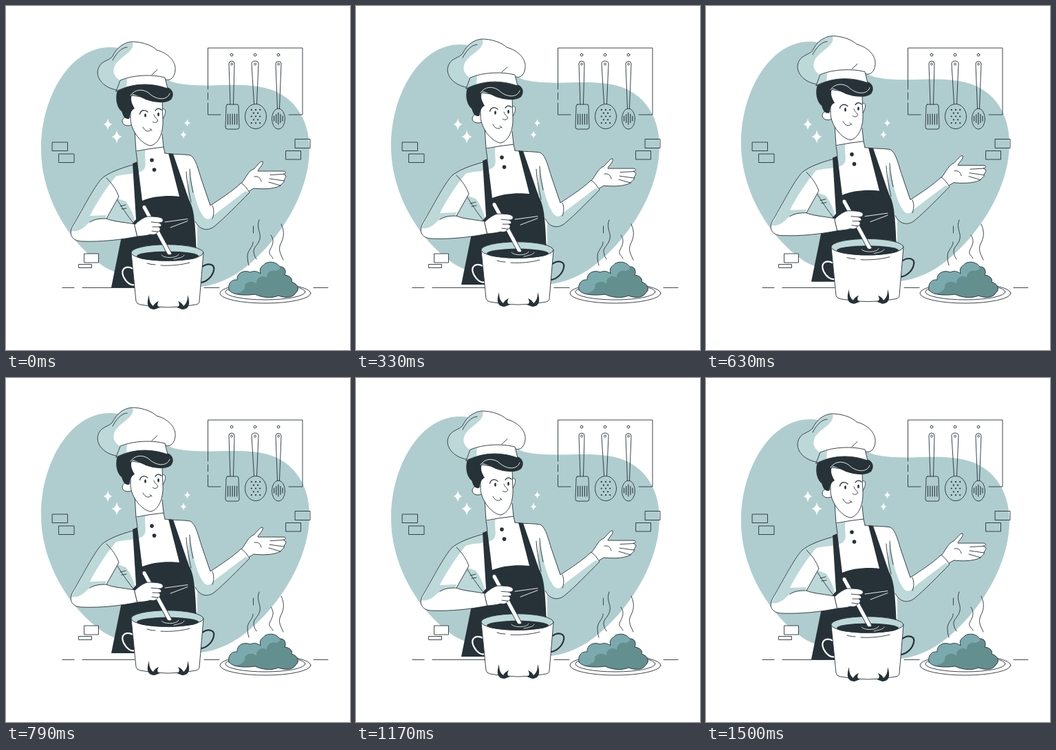
An HTML page with a canvas for the animation above (1.54 s loop, 500 by 500 pixels).

```html
<!DOCTYPE html>
<html lang="en">
<head>
<meta charset="utf-8">
<title>Chef stirring a pot</title>
<style>
  html, body { margin: 0; width: 100%; height: 100%; overflow: hidden; background: #fff; }
  canvas { display: block; width: 100vw; height: 100vh; }
</style>
</head>
<body>
<canvas id="stage" width="500" height="500"></canvas>
<script>
const ctx = document.getElementById('stage').getContext('2d');
const INK = '#263238', TEAL = '#afcdcf', SHADE = '#bdd8d9', WHITE = '#fff';
const FOOD = '#7aaaad', FOOD_SHADE = '#648f8f';
const LOOP = 1540, PERIOD = 1500, LEAD = 20, FRAME = 1000 / 24, RISE = 10;

ctx.lineCap = ctx.lineJoin = 'round';

function paint(path, fill, stroke, width = 1) {
  const p = typeof path === 'string' ? new Path2D(path) : path;
  if (fill) { ctx.fillStyle = fill; ctx.fill(p); }
  if (stroke) { ctx.strokeStyle = stroke; ctx.lineWidth = width; ctx.stroke(p); }
}
const fill = (d, color) => paint(d, color);
const line = (d, width = 0.9, color = INK) => paint(d, null, color, width);
const solid = (d, color = WHITE) => paint(d, color, INK, 0.9);

function oval(x, y, rx, ry, color, stroke, width = 0.9) {
  const p = new Path2D();
  p.ellipse(x, y, rx, ry, 0, 0, Math.PI * 2);
  paint(p, color, stroke, width);
}

function sparkle(x, y, w, h) {
  fill(`M${x} ${y - h}Q${x + w * .16} ${y - h * .16} ${x + w} ${y}Q${x + w * .16} ${y + h * .16} ${x} ${y + h}` +
       `Q${x - w * .16} ${y + h * .16} ${x - w} ${y}Q${x - w * .16} ${y - h * .16} ${x} ${y - h}Z`, WHITE);
}

function blob() {
  fill('M51 208C51 130 95 58 153 60C205 62 212 104 248 112C285 120 330 111 366 117C416 124 441 162 441 208' +
       'C441 262 411 314 382 347C354 379 323 403 284 408C240 412 188 402 146 381C95 349 51 280 51 208Z', TEAL);
}

function slots(x, step, count, top, bottom) {
  for (let i = 0; i < count; i++) {
    const bend = 2.5 * Math.abs(i - (count - 1) / 2) * (step < 3.2);
    line(`M${x + i * step} ${top + bend}V${bottom - bend}`, 1.1);
  }
}

function utensils() {
  line('M293.5 121V61H431V158H411M293.5 126V136M293.5 141V158H312');
  for (const x of [328, 362, 396]) {
    oval(x, 71, 1.9, 1.9, null, INK);
    oval(x, 84.5, 1.5, 1.5, null, INK, 0.8);
  }
  line('M326 143L324 84Q324 80 328 80Q332 80 332 84L330.5 143' +
       'M322 143H336Q338 143 338 146L339 176Q339 179 336 179H322Q319 179 319 176L320 146Q320 143 322 143Z');
  slots(322.5, 3.3, 5, 157, 172);
  line('M360.5 142L357 84Q357 80 362 80Q367 80 367 84L364.5 142');
  oval(363, 160.5, 15.5, 18, null, INK);
  for (let row = -2; row <= 2; row++) {
    const n = row % 2 ? 2 : 3;
    for (let i = 0; i < n; i++) oval(363 + (i - (n - 1) / 2) * 6.2, 160.5 + row * 4.8, 1.1, 1.1, INK);
  }
  line('M394.5 149L392 84Q392 80.5 396 80.5Q400 80.5 400 84L397.5 149');
  oval(396, 164, 9.5, 15, null, INK);
  slots(389.6, 3.1, 5, 155, 172);
}

function bricks() {
  const b = [[67.5, 198, 22, 12.5], [77, 215, 22, 12.5], [420.5, 193.5, 21.5, 13],
             [407, 210.5, 21.5, 12.5], [114, 360, 20.5, 13], [106, 375.5, 18.5, 5]];
  for (const [x, y, w, h] of b) paint(`M${x} ${y}h${w}v${h}h${-w}Z`, y > 300 && WHITE, INK, 0.9);
}

function rightArm() {
  solid('M342 258C350 248 352 240 360 237C366 231 370 225 373 226C375 230 367 236 366 240L404 240' +
        'C408 241 407 244 403 244L407 247C407 250 405 250 404 254C405 257 400 258 399 261C388 267 370 266 360 265L352 270Z');
  line('M384 245.5L403 244.5M383 251L404 254M382 256L399 261M361 248C367 247 370 250 371 255');
  const arm = 'M268 217C276 221 280 240 284 252L297 290C312 280 328 270 342 257Q349 262 354 271' +
              'C337 288 318 308 302 321C292 328 281 325 275 313L266 280Z';
  fill(arm, WHITE);
  fill('M266 240C271 262 276 288 284 301C289 312 297 312 302 304L348 269L354 271C337 288 318 308 302 321' +
       'C292 328 281 325 275 313L264 280Z', SHADE);
  line('M231 214C244 216 258 215 268 217C276 221 280 240 284 252L297 290C312 280 328 270 342 257Q349 262 354 271' +
       'C337 288 318 308 302 321C292 328 281 325 275 313');
  line('M262 241C263 258 266 270 269 285M267 237C268 252 270 262 272 271M300 290C303 297 302 304 300 309');
}

function torso() {
  fill('M189 211L229 205L231 214L268 217C276 222 280 240 284 252L278 310V350H170L178 316L160 278L140 250C155 240 175 236 191 226Z', WHITE);
  fill('M189 211L203 208C200 220 206 232 200 238C190 246 172 243 158 248L140 250C155 240 175 236 191 226Z', SHADE);
  fill('M160 279L174 284C182 294 186 306 189 318L147 309Z', SHADE);
  line('M191 226L189 211M229 205L231 214');
  line('M160 279C168 292 176 304 187 318M166 291L174 289M168 295L175 294');
  oval(212, 224, 2.8, 2.8, INK);
  oval(215.5, 238, 2.8, 2.8, INK);
}

function apron() {
  fill('M184 229L191 226L198 283C215 276 236 275 252 277L236 214L243 215L266 282C273 294 275 310 277 360' +
       'L230 409H153L168 335L189 310Z', INK);
  line('M231 314L264 309.5M239 322L264 312.5', 0.9, WHITE);
}

function leftArm() {
  fill('M140 250C128 262 108 302 96 322C91 333 97 342 111 342C138 343 165 340 191 335L187 317C170 314 154 313 146 309' +
       'L164 277C160 266 154 258 146 250Z', WHITE);
  fill('M140 250L160 247C146 264 130 288 122 305L146 304L144 309C130 309 122 313 115 320C107 327 101 328 95 327' +
       'C105 309 126 266 140 250Z', SHADE);
  line('M184 231C166 236 150 242 140 250C128 262 108 302 96 322C91 333 97 342 111 342C138 343 165 340 191 335L187 317' +
       'C170 314 154 313 146 309L164 277C160 266 154 258 146 250M122 314C130 309 138 309 146 309');
}

function head() {
  fill('M186 165L189 212Q209 207 229 205L226 178Z', WHITE);
  line('M187 180L189 211Q209 207 229 205L227 186');
  solid('M227 150C233 147 233 156 228 164Z');
  solid('M182 163C177 159 169 161 169 168C170 174 177 175 182 173Z');
  solid('M181 130L181 165C182 182 197 201 210 203C221 201 229 185 228 165L227 137Z');
  fill('M163 121C180 111 215 112 234 118C243 121 245 129 240 136C231 143 214 140 203 136C197 133 190 129 184 128' +
       'C179 135 184 144 187 149C182 151 180 158 179 164C171 165 170 158 168 153C160 147 158 130 163 121Z', INK);
  line('M181 130C187 121 198 120 207 126C218 137 234 138 238 127', 0.9, WHITE);
  oval(202.5, 159, 1.4, 2.8, INK);
  oval(221.5, 157.5, 1.4, 2.8, INK);
  line('M194.5 157C196 151 202 150 206 154M217 152C219 148.5 223 148 226 151', 1.3);
  line('M215 158C216 163 221 164 220.5 167C219 170 215 170 213 168M199 176C202 182 207 184 211 180M209 178L212 181');
}

function hat() {
  const puff = 'M161 122C140 119 127 101 136 87C140 80 150 79 155 73C161 60 173 51 187 52C201 53 213 58 219 64' +
               'C235 68 247 80 246 93C245 104 239 109 232 107L166 114Z';
  fill(puff, WHITE);
  fill('M161 122C140 119 127 101 136 87C140 80 150 79 155 73C161 60 171 53 184 52C188 66 168 72 159 85C153 96 158 104 167 109Z', SHADE);
  line(puff);
  const band = 'M160 124L166 108C185 100 213 99 231 104L235 120C210 111 184 112 160 124Z';
  fill(band, WHITE);
  fill('M160 124L166 108L176 105L175 118Z', SHADE);
  line(band);
  line('M155 79C160 69 168 60 176 60M212 100L220 92.5');
}

function pot() {
  line('M185 382C173 376 166 383 171 394C175 402 182 407 187 405', 2.2, WHITE);
  line('M285 379C295 372 304 376 302 384C300 394 291 401 283 402', 2.2);
  solid('M182 359L189 429Q190 433 195 434Q235 442 276 434Q281 433 281 429L287 359Z');
  oval(234.5, 358.5, 52.5, 11.8, SHADE, INK);
  oval(235, 363.5, 45, 7, INK);
  line('M226 362C229 367 249 367 251 361M244 368C253 366 258 365 259 362', 0.8, WHITE);
  line('M205 374Q211 376 217 376M225 377C240 378 256 376 267 373');
  const flame = 'M208 420C204 432 205 441 216 441L224 438C220 437 219 434 222 429C217 431 215 434 214 436C209 432 208 427 208 420Z';
  fill(flame, INK);
  ctx.save();
  ctx.translate(472, 0);
  ctx.scale(-1, 1);
  fill(flame, INK);
  ctx.restore();
}

function stirringHand() {
  solid('M198 293Q198 288 203 290L241 360Q239 363 235 361Z');
  solid('M187 318C193 312 200 307 206 306C214 306 226 306 228 310C229 314 226 315 222 315C227 317 227 321 222 321' +
        'C226 323 224 328 220 328C220 332 215 333 210 332C204 334 198 334 191 335Z');
  line('M222 315L211 314M222 321L213 321M220 328L212 327');
}

function plate() {
  oval(377, 417.5, 66, 14.5, WHITE, INK);
  oval(377, 415.5, 58, 11.5, WHITE, INK);
  const right = 'C405 378 408 386 405 391C414 392 417 398 415 401C425 404 427 413 421 417' +
                'C418 424 405 425 396 421C385 426 370 423 362 419';
  const food = 'M324 413C322 402 329 397 336 398C335 388 346 383 355 387C361 384 366 386 370 389C367 379 374 378 377 374' +
               'C385 370 394 373 398 379' + right + 'C350 421 330 421 324 413Z';
  fill(food, FOOD);
  fill('M330 418C341 418 349 412 347 406C350 400 360 399 364 404C363 395 372 390 379 395C379 387 385 383 392 385' +
       'C397 383 399 382 398 379' + right + 'C350 421 338 420 330 418Z', FOOD_SHADE);
  line(food);
  line('M368 311C363 322 371 329 369 338C367 348 359 350 360 358Q361 364 364 368M359.5 320V330' +
       'M359 343C360 350 350 355 351 365Q351 371 353 377M385 333C391 341 387 348 384 354C380 361 387 363 388 367' +
       'M400 317C406 330 403 338 399 346C395 355 400 362 403 369');
}

function render(now) {
  const t = Math.floor((now % LOOP) / FRAME + 0.05) * FRAME;
  const phase = ((t + LEAD) % PERIOD) / PERIOD;
  const lift = RISE * (1 - Math.abs(1 - 2 * phase));
  const floating = (...parts) => {
    ctx.save();
    ctx.translate(0, 0.27 - lift);
    parts.forEach(part => part());
    ctx.restore();
  };

  ctx.fillStyle = WHITE;
  ctx.fillRect(0, 0, 500, 500);
  floating(blob);
  utensils();
  bricks();
  sparkle(148, 172, 6.5, 8.5);
  sparkle(161, 190, 7.5, 9.8);
  sparkle(263.5, 170, 4.6, 5.8);
  sparkle(258, 187, 4.6, 6);
  line('M82 409.5H99M111 409.5H187M288 409.5H310M447 409.5H468');
  floating(torso, rightArm, apron, leftArm, head, hat, pot, stirringHand);
  plate();
}

const start = performance.now();
function tick() {
  render(performance.now() - start);
  requestAnimationFrame(tick);
}
tick();
</script>
</body>
</html>
```
